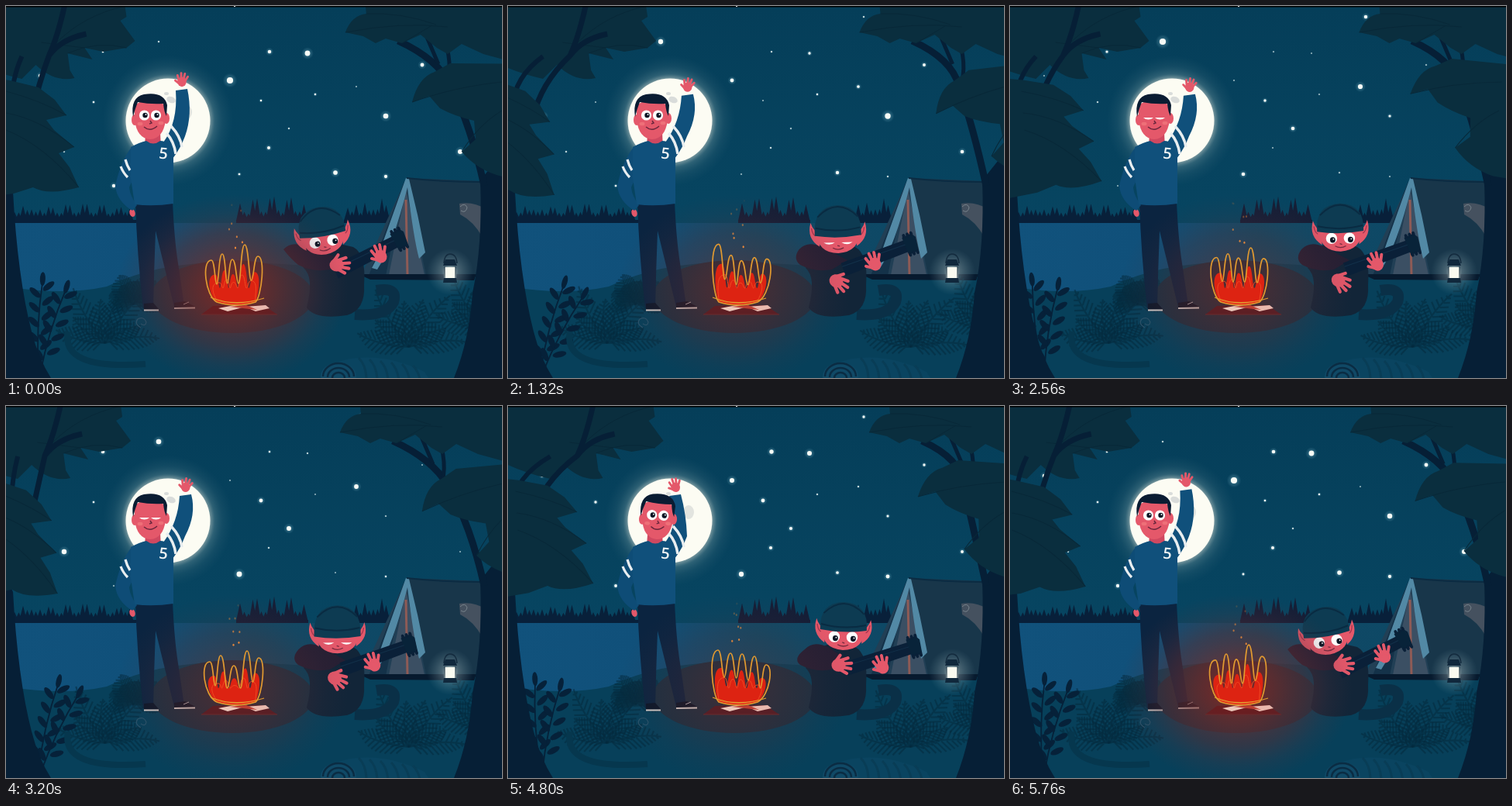
Write an HTML page with a canvas that moves like this. It is 640 by 480 pixels and loops after 5.8 s.

```html
<!DOCTYPE html>
<html lang="en">
<head>
<meta charset="utf-8">
<title>Campfire night</title>
<style>
html, body { margin: 0; width: 100%; height: 100%; overflow: hidden; background: #07405a; }
canvas { display: block; }
</style>
</head>
<body>
<canvas id="stage" width="640" height="480"></canvas>
<script>
const g = document.getElementById('stage').getContext('2d');
const LOOP = 5800, SWAY = LOOP / 2, BEAT = LOOP / 3, TAU = Math.PI * 2;
const SKIN = '#e4586a', NAVY = '#0a2038', LEAF = '#0a2e3e', VEIN = '#082838', SWEATER = '#10507b', BARK = '#061f36';
let t = 0;

const osc = (period, peak = 0) => Math.cos(TAU * (t - peak) / period);
const clamp = v => Math.max(0, Math.min(1, v));
const ease = v => { v = clamp(v); return v * v * (3 - 2 * v); };

function fill(d, color) { g.fillStyle = color; g.fill(new Path2D(d)); }
function line(d, color, width = 1) {
  g.strokeStyle = color; g.lineWidth = width; g.stroke(new Path2D(d));
}
function oval(x, y, rx, ry, color, turn = 0) {
  g.fillStyle = color; g.beginPath(); g.ellipse(x, y, rx, ry, turn, 0, TAU); g.fill();
}
function glow(x, y, r, stops, squash = 1) {
  g.save(); g.translate(x, y); g.scale(1, squash);
  const grad = g.createRadialGradient(0, 0, 0, 0, 0, r);
  stops.forEach(([at, color]) => grad.addColorStop(at, color));
  g.fillStyle = grad; g.fillRect(-r, -r, 2 * r, 2 * r); g.restore();
}
function at(x, y, turn, draw) {
  g.save(); g.translate(x, y); g.rotate(turn); draw(); g.restore();
}
// Eased value between [time, ...values] rows.
function track(rows, time) {
  let i = 0;
  while (i < rows.length - 2 && time > rows[i + 1][0]) i++;
  const [a, b] = [rows[i], rows[i + 1]], k = ease((time - a[0]) / (b[0] - a[0]));
  return a.slice(1).map((v, n) => v + (b[n + 1] - v) * k);
}

// x, y, time of greatest size, extra radius
const stars = [
  [197, 46, 2300, 3.5], [125, 59, 4000, 2], [340, 59, 5000, 2], [389, 61, 5500, 2.8],
  [459, 14, 3400, 2], [537, 76, 300, 1.8], [289, 96, 5800, 3.4], [329, 122, 4000, 2.2],
  [399, 114, 500, .6], [452, 104, 2700, 2.4], [365, 158, 3600, 2.4], [339, 183, 5200, 1.5],
  [301, 217, 3900, 3.3], [425, 215, 300, 2.2], [490, 142, 800, 3.3], [490, 220, 5000, 1.8],
  [586, 188, 300, 2.4], [590, 102, 3200, 2.2], [44, 90, 5700, 1.5], [46, 142, 2500, 3.2],
  [75, 188, 3500, 2.6], [113, 124, 4500, 1], [139, 232, 5600, 1.5], [29, 228, 4800, 1.5]
];

function sky() {
  const grad = g.createLinearGradient(0, 0, 0, 280);
  grad.addColorStop(0, '#053e59'); grad.addColorStop(1, '#074561');
  g.fillStyle = grad; g.fillRect(0, 0, 640, 480);
  for (const [x, y, peak, size] of stars) {
    const r = .7 + size * Math.pow(.5 + .5 * osc(LOOP, peak), 1.2);
    glow(x, y, r * 2.3, [[0, 'rgba(170,215,225,.5)'], [1, 'rgba(120,180,200,0)']]);
    oval(x, y, r, r, '#f6fbf6');
  }
  glow(209, 148, 84, [[0, '#dfe6da'], [.64, 'rgba(205,216,208,.6)'], [.72, 'rgba(125,160,165,.33)'], [.84, 'rgba(70,115,130,.2)'], [1, 'rgba(50,100,120,0)']]);
  oval(209, 148, 54.5, 54.5, '#fcfcf3');
  oval(213, 121, 6, 4, '#d9dcda', .4); oval(233, 137, 7, 9, '#e2e4df');
  oval(207, 113, 3, 2, '#d9dcda');
}

function forest(x0, x1, height, color) {
  let d = `M${x0} 276H${x1}V281H${x0}Z`;
  for (let x = x0, i = 0; x < x1 - 8; x += 5.5, i++) {
    const h = 6 + height * Math.abs(Math.sin(i * 2.3 + x0) * Math.cos(i * .7 + 1));
    d += `M${x} 277L${x + 5} ${274 - h}L${x + 10} 277Z`;
  }
  fill(d, color);
}

function land() {
  forest(6, 168, 15, '#08203a');
  forest(297, 390, 25, '#151e36');
  forest(436, 502, 23, '#08203a');
  const lake = g.createLinearGradient(0, 0, 640, 0);
  lake.addColorStop(0, '#11527c'); lake.addColorStop(.27, '#10507a'); lake.addColorStop(.5, '#114965'); lake.addColorStop(1, '#0b4866');
  g.fillStyle = lake; g.fillRect(0, 280, 640, 100);
  fill('M0 362Q75 374 130 362Q200 328 300 331Q420 333 470 350L640 351L640 480L0 480Z', '#07405a');
}

function tent() {
  fill('M517 222L614 226Q621 300 606 348L540 348Z', '#18364a');
  fill('M517 222L458 348L542 348Z', '#213f55');
  fill('M514 226L468 348L490 348Z', '#143249');
  fill('M516 237L494 347L540 347Z', '#3b4f63');
  fill('M516 222L487 303Q481 322 472 338L479 340Q499 310 518 234Q526 300 533 326L541 318Q532 270 520 223Z', '#5289a5');
  line('M516 250L518 347', '#8e5b56', 3);
  line('M517 222Q560 227 614 227', '#0b2b42', 2);
  fill('M585 255Q603 252 619 262L615 299Q604 278 586 269Z', '#45515f');
  line('M586 259Q592 253 595 260Q593 268 587 264', '#77838b', 1);
  fill('M455 346L607 346L604 354L470 353Z', '#071a2e');
}

function frond(x, y, len, angle, color) {
  at(x, y, angle, () => {
    let d = `M0 0Q${len * .6} -5 ${len} 6`;
    for (let i = 1; i < 11; i++) {
      const u = i / 11, px = len * u, py = 6 * u * u - 5 * u * (1 - u), w = 15 * Math.sin(Math.PI * (u * .8 + .2));
      d += `M${px} ${py}l${w * .7} ${-w}M${px} ${py}l${w * .7} ${w}`;
    }
    line(d, color, 2.2);
  });
}
function fern(x, y, size, sway) {
  for (let i = 0; i < 8; i++) frond(x, y, size * (.8 + .2 * Math.sin(i * 4)), -2.95 + i * .4 + sway, 'rgba(5,43,62,.55)');
}
function sprig(x, y, len, lean) {
  at(x, y, lean, () => {
    line(`M0 0Q-6 ${-len / 2} 0 ${-len}`, '#062139', 1.8);
    for (let i = 1; i < 6; i++) {
      const py = -len * i / 6;
      oval(-9, py - 5, 9, 3.8, '#062139', .7);
      oval(8, py - 14, 9, 3.8, '#062139', -.7);
    }
    oval(0, -len - 4, 3.5, 9, '#062139');
  });
}

function plants() {
  const s = osc(SWAY, 850);
  fern(128, 435, 82, s * .08);
  fern(520, 440, 86, s * .07);
  fern(615, 415, 78, s * .06);
  fern(165, 385, 42, s * .06);
  sprig(42, 470, 114, .12 + s * .28);
  sprig(44, 475, 114, .36 + s * .24);
  line('M174 415Q165 410 170 404Q178 400 181 408Q180 414 174 410', '#28536b', 1.2);
  line('M80 420Q70 470 180 462', '#06374e', 8);
}

function hand(x, y, turn, size = 1) {
  at(x, y, turn, () => {
    g.scale(size, size);
    oval(0, 1, 6, 6.5, SKIN);
    g.lineCap = 'round';
    line('M-4 0L-6 -8M-1 -3L-1 -11M2 -2L4 -10M4 0L8 -6M-4 3L-9 -1', SKIN, 3);
    g.lineCap = 'butt';
  });
}

function eyes(gap, y, r, shut, lookX, lookY) {
  for (const side of [-1, 1]) {
    if (shut) {
      fill(`M${side * gap - r} ${y + 3}Q${side * gap} ${y + 8} ${side * gap + r} ${y + 3}Z`, '#fff');
      continue;
    }
    oval(side * gap, y, r, r, '#fff');
    oval(side * gap + lookX, y + lookY, r * .48, r * .5, '#0a1524');
    oval(side * gap + lookX + 1, y + lookY - 1, .9, .9, '#fff');
  }
}

function man(fold) {
  fill('M167 253L215 253Q217 300 222 332L230 387L217 388L193 290Q191 340 190 389L177 390Q169 320 167 253Z', '#0b2440');
  fill('M178 384L190 383L197 391L178 392Z', '#0a1729');
  fill('M217 383L231 381L244 388L217 390Z', '#0a1729');
  line('M178 392.5L197 392.5M217 390L244 389.5', '#d5cfcb', 1.8);
  line('M229 385L236 382', '#b8b5b8', 1);

  oval(163, 267, 3.6, 5, SKIN, -.3);
  fill('M163 181Q148 199 141 232Q143 252 163 264L169 257Q160 245 159 234L172 205Z', '#0e4c76');
  fill('M180 166L199 164L200 182Q190 188 179 180Z', '#cf4860');
  fill('M161 182Q172 176 181 174Q190 181 199 174Q211 174 216 188L216 255Q190 259 166 256L161 222Z', SWEATER);
  line('M154 198Q156 206 160 212M148 207Q151 215 157 221', '#e9eef0', 3.2);

  const [hx, hy] = track([[0, 227, 97], [173, 230, 99], [680, 232, 104], [933, 216, 104], [967, 215, 104]], fold);
  hand(hx, hy, (hx - 227) * .03, .95);
  fill(`M${hx - 8} ${hy + 12}L${hx + 7} ${hy + 10}Q${hx + 14} 140 231 168Q225 184 215 197L203 176Q222 150 ${hx - 8} ${hy + 12}Z`, SWEATER);
  line('M213 155Q225 168 227 182M207 164Q217 175 219 191', '#e9eef0', 3.5);
  at(203, 192, .1, () => {
    g.fillStyle = '#eef3f3'; g.font = '600 20px "Open Sans", sans-serif';
    g.textAlign = 'center'; g.textBaseline = 'middle'; g.fillText('5', 0, 0);
  });

  const tilt = ease((fold - 700) / 200);
  at(186 + tilt * 7, 146, tilt * .06, () => {
    oval(-20, 1, 4, 7, SKIN); oval(21, -1, 4, 7, SKIN);
    fill('M-20 -18Q0 -32 19 -18L20 1Q17 25 0 26Q-17 25 -20 1Z', SKIN);
    fill('M-22 -3Q-26 -28 -8 -32Q18 -36 22 -18L21 -4Q18 -9 17 -20Q0 -19 -16 -22Q-20 -12 -22 -3Z', '#0a1c32');
    eyes(7.5, -5, 6.6, fold > 620 && fold < 725, 1, 0);
    line('M0 2L2 5L-1 6M-8 10Q0 17 9 9', '#69263c', 1.4);
    oval(-13, 6, 3.5, 2.3, '#ee7078'); oval(14, 5, 3.5, 2.3, '#ee7078');
  });
}

function elf(c, phase) {
  const x = 420.5 - 12.5 * c, strum = osc(BEAT / 2);
  line('M450 398Q490 401 500 382Q506 362 478 367', '#0a3047', 14);
  fill(`M${x - 32} 314Q${x - 10} 298 448 311Q465 320 462 360Q464 392 440 399Q398 405 388 389Q398 350 384 338Z`, '#122538');
  fill(`M${x - 50} 314Q${x - 39} 302 ${x - 20} 311L438 328L418 340Q396 344 377 334Q367 326 ${x - 50} 314Z`, '#261f33');

  at(430, 340, -.38 - .08 * c, () => {
    g.translate(-6 * c, 0);
    fill('M0 -8L88 -8L88 8L0 10Z', NAVY);
    fill('M85 -12L98 -13L102 -7L100 11L86 12Z', '#082339');
    line('M0 -3L86 -2', '#123049', 1);
    for (const px of [88, 93, 98]) { oval(px, -13, 2, 3, NAVY); oval(px, 12, 2, 3, NAVY); }
  });
  hand(426 + 2 * strum, 347 - 13 * strum, 1.9 - .4 * strum, 1.4);
  hand(477 + 6 * strum, 329 - 7 * c, -.45, 1.3);

  const bow = clamp(1 - Math.abs(phase - 1267) / 220);
  at(x, 288 + 3 * c + 3 * bow, -.065 - .1 * c, () => {
    for (const side of [-1, 1]) {
      g.save(); g.scale(side, 1);
      fill('M24 4Q32 0 35 -10Q41 10 24 21Z', SKIN);
      line('M29 7Q33 5 34 -3', '#a43750', 1.3);
      g.restore();
    }
    fill('M-28 2L28 2Q27 29 0 30Q-27 29 -28 2Z', SKIN);
    eyes(11.5, 13, 7.2, bow > .45, c > .5 ? 3 : 1.5, 2);
    line('M-1 20L2 21M-7 23Q0 27 7 23', '#772c40', 1.3);
    const brim = 4 + 4 * bow;
    fill(`M-30 ${brim}Q-32 -31 0 -32Q32 -31 30 ${brim}Q0 ${brim + 5} -30 ${brim}Z`, '#0d3b52');
    line(`M-29 -3Q0 4 29 -3M-26 -17Q0 -43 26 -17`, '#092b42', 2);
  });
}

// time, then x and y of the five flame tips
const flames = [
  [0, 265, 328, 279, 320, 292, 327, 308, 308, 325, 323],
  [300, 263, 330, 277, 322, 294, 335, 311, 316, 326, 325],
  [680, 261, 344, 284, 320, 297, 330, 314, 306, 331, 342],
  [1140, 272, 306, 288, 322, 301, 330, 318, 325, 334, 325],
  [1900, 271, 315, 287, 319, 302, 320, 318, 323, 333, 334],
  [2900, 265, 328, 279, 320, 292, 327, 308, 308, 325, 323]
];
function flamePath(tips, height, width, bottom) {
  const p = [];
  for (let i = 0; i < 10; i += 2) p.push([297 + (tips[i] - 297) * width, 386 - (386 - tips[i + 1]) * height]);
  let d = `M272 ${bottom}C${p[0][0] - 8} ${bottom - 8} ${p[0][0] - 13} ${p[0][1]} ${p[0][0]} ${p[0][1]}`;
  for (let i = 0; i < 4; i++) {
    const [ax, ay] = p[i], [bx, by] = p[i + 1];
    const vx = (ax + bx) / 2, vy = Math.min(364, Math.max(ay, by) + 31 * height);
    const m = (ax + vx) / 2 + 1, n = (vx + bx) / 2 - 1;
    d += `C${m} ${ay} ${m} ${vy} ${vx} ${vy}C${n} ${vy} ${n} ${by} ${bx} ${by}`;
  }
  const [ex, ey] = p[4];
  return d + `C${ex + 10} ${ey} ${ex + 5} ${bottom - 8} 322 ${bottom}Q297 ${bottom + 8} 272 ${bottom}Z`;
}

function fire() {
  const tips = track(flames, t % SWAY);
  fill('M252 398L267 387L332 386L350 398Z', 'rgba(110,24,27,.65)');
  line('M252 398L350 398', '#6c2a2c', 1);
  fill(flamePath(tips, .68, .84, 382), '#dd2312');
  line(flamePath(tips, .5, .68, 380), '#f04a23', 1);
  fill('M274 390L295 386L309 388L286 394Z', '#ecc7ba');
  fill('M308 388L335 386L340 390L322 394Z', '#e9b9ae');
  fill('M288 388L310 386L324 392L306 390Z', '#ba3d32');
  line(flamePath(tips, 1, 1, 382), '#e29a30', 1.7);
  line('M264 376Q295 389 333 377', '#e29a30', 1.3);
  for (let i = 0; i < 7; i++) {
    const u = (t / SWAY * (1 + i % 2) + i * .37) % 1;
    g.globalAlpha = 1 - u;
    oval(296 + 9 * Math.sin(i * 2.4 + u * 5), 312 - 65 * u, 1.1, 1.5, '#f08b3a');
  }
  g.globalAlpha = 1;
}

function lantern() {
  glow(573, 343, 30, [[0, 'rgba(245,250,240,.8)'], [.35, 'rgba(190,210,210,.3)'], [1, 'rgba(130,170,180,0)']]);
  line('M565 332Q566 320 573 320Q581 320 582 332', '#142b3e', 1.5);
  fill('M566 337L580 337L581 352L565 352Z', '#fafbf0');
  fill('M564 335L567 327L579 327L582 335Z', '#10283c');
  line('M566 336L566 353M580 336L580 353', '#20394a', 1.2);
  fill('M565 351L581 351L582 357L564 357Z', '#10283c');
}

function log() {
  fill('M420 462Q475 441 540 472L545 480L420 480Z', '#0a4460');
  for (let i = 0; i < 6; i++) line(`M${455 + i * 14} ${454 + i * 2}q10 10 10 28`, '#093d56', 3);
  oval(429, 478, 23, 18, '#104966');
  line('M409 478A20 17 0 0 1 449 478M415 479A14 12 0 0 1 443 479M421 480A8 7 0 0 1 437 480', '#0a2c43', 2.5);
}

function trees() {
  const l = 15 - 20 * osc(SWAY, 350), r = 10 - 18 * osc(SWAY, 450), u = osc(SWAY, 850) + .27;
  fill('M0 220L9 240Q15 350 33 420Q42 455 58 480L0 480Z', BARK);
  fill('M640 190L612 225Q615 310 602 370Q598 430 578 480L640 480Z', BARK);

  at(l, 0, 0, () => {
    fill('M-50 0L153 0L155 14L147 19L166 45L155 54L125 59L101 54L111 69L79 61L82 83L88 93Q62 99 38 76L20 94Q-20 85 -50 68Z', LEAF);
    line('M153 0Q100 12 65 47M101 54L45 47M155 54Q118 44 79 61', VEIN, 1);
  });
  line(`M32 145Q42 100 ${55 + l} 64Q${66 + l} 40 ${75 + l} 0M${55 + l} 64Q${70 + l} 43 ${103 + l} 36`, BARK, 7);
  line(`M6 130Q8 92 ${20 + l} 65`, BARK, 6);
  at(-28 * u, 130, u * .14, () => {
    fill('M-60 -45L5 -34L42 -25L63 -9L78 11L52 17L62 30L88 52L68 60L82 78L94 104Q55 115 35 104L10 112L-60 120Z', LEAF);
    line('M0 -20Q45 -8 78 11M0 8Q45 16 88 52M0 30Q50 50 94 104', VEIN, 1);
  });

  line(`M617 232Q600 155 ${574 + r / 2} 103Q${557 + r} 68 ${506 + r} 45`, BARK, 9);
  line(`M${558 + r} 75L${538 + r} 28M${570 + r} 98Q${578 + r} 65 ${558 + r} 25`, BARK, 5);
  at(r, 0, 0, () => {
    fill('M438 34Q446 12 465 10L464 0L690 0L690 82L616 62L588 49L570 62L556 54L535 37L511 48L490 42L477 48L461 39Z', LEAF);
    line('M438 34Q510 20 570 27M465 10Q510 8 555 24M511 48L550 25', VEIN, 1);
  });
  at(640 + 24 * u + r * .5, 120, -u * .16, () => {
    fill('M-116 4Q-108 -28 -87 -35L-67 -46L70 -45L70 105L0 100Q-32 92 -52 68L-34 52L-36 28Q-62 22 -80 12L-94 -4Z', LEAF);
    line('M-116 4Q-60 -16 0 -22M-52 68Q-30 33 0 15', VEIN, 1);
  });
}

function draw() {
  t = Math.floor((performance.now() % LOOP) / 40) * 40;
  const phase = t % BEAT, fold = Math.min(phase, BEAT - phase), c = osc(BEAT);
  const heat = .68 + .32 * c;
  sky();
  land();
  tent();
  plants();
  oval(292, 375, 105, 47, '#1b3041');
  log();
  elf(c, phase);
  man(fold);
  glow(292, 366, 150, [
    [0, `rgba(165,38,27,${heat * .75})`], [.35, `rgba(125,43,39,${heat * .6})`],
    [.6, `rgba(98,45,49,${heat * .45})`], [.8, `rgba(90,50,60,${heat * .18})`], [1, 'rgba(80,50,60,0)']
  ], .82);
  fire();
  lantern();
  trees();
  g.fillStyle = '#000'; g.fillRect(0, 0, 640, 1.5);
  g.fillStyle = '#fff'; g.fillRect(294, 0, 2, 1);
  requestAnimationFrame(draw);
}
draw();
</script>
</body>
</html>
```
